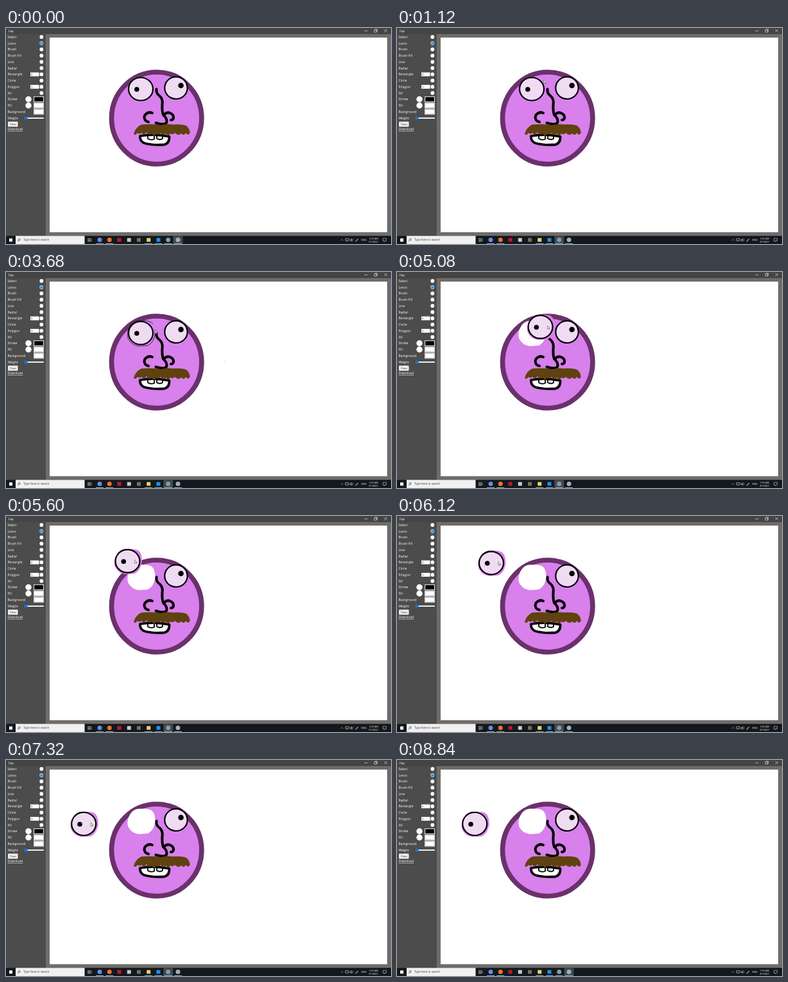
Write an HTML page that moves like this. It is 600 px wide and 338 px high and loops after 9.6 s.

```html
<!DOCTYPE html>
<html>
<head>
<meta charset="utf-8">
<style>
html, body { margin: 0; width: 100%; height: 100%; overflow: hidden; background: #6f6d6b; }
svg { display: block; width: 600px; height: 338px; }
text { font-family: "Open Sans", "Noto Sans", sans-serif; font-size: 5px; fill: #fff; }
.ink { fill: none; stroke: #000; stroke-linecap: round; stroke-linejoin: round; }
</style>
</head>
<body>
<svg viewBox="0 0 600 338">
  <defs>
    <clipPath id="cut"><path class="loop"/></clipPath>
  </defs>
  <rect width="600" height="338" fill="#6f6d6b"/>
  <rect y="9" width="62" height="317" fill="#4c4c4c"/>
  <rect width="600" height="9.5" fill="#444"/>
  <rect x="68" y="15" width="526" height="304.5" fill="#fff"/>
  <text x="4" y="6.8">File</text>
  <path d="M558.5 4.5h5M574 3h3.5v3.5h-3.500zM575 3v-1h3.500v3.500h-1M589.500 2l4.500 4.500m0-4.500l-4.500 4.500" fill="none" stroke="#ddd" stroke-width=".7"/>
  <g id="panel"></g>

  <g id="face">
    <ellipse cx="234.700" cy="141" rx="70.200" ry="72" fill="#d880ec" stroke="#6a316b" stroke-width="7.700"/>
    <g fill="#efdcf3" stroke="#000" stroke-width="2.200">
      <ellipse cx="210" cy="95.500" rx="19" ry="18"/>
      <ellipse cx="265" cy="93.700" rx="17.700" ry="17.300"/>
    </g>
    <circle cx="203.800" cy="96" r="3.800"/>
    <circle cx="272.600" cy="90" r="4.300"/>
    <g class="ink" stroke-width="4">
      <path d="M234.500 95.500Q233.500 102 239 106Q245 111 243.500 120Q243 130 245 136Q251 141 250.500 147Q249 153 233.500 148.500"/>
      <path d="M228 133C221 130 214 136 216 142Q217 146 222 147"/>
      <path d="M247 135C253 129 262 135 261 141Q260 144 257 144"/>
    </g>
    <path class="ink" d="M209 169Q208 176 215 180Q228 184 247 182.500Q255 180 254.500 170Q231 165 209 169Z" stroke-width="3.800" style="fill:#fff"/>
    <path class="ink" d="M221 168v5q4 3 10 1v-5M235 168v5q5 3 9 0v-4" stroke-width="1.800"/>
    <path d="M199 166Q201 156 211 151Q233 149.500 241 152Q250 149.500 260 151Q274 150 281 153Q287 158 286.500 165Q283 169 280 164Q278 170 273 165Q268 170 263 164Q260 168 256 165Q253 172 249 165Q246 171 241 164Q238 169 234 165Q231 172 227 165Q223 170 219 163Q215 169 211 164Q207 167 205 164Q202 169 199 166Z" fill="#5f420f"/>
  </g>

  <g id="moved">
    <path class="loop" fill="#fff"/>
    <use id="piece" href="#face" clip-path="url(#cut)"/>
  </g>
  <path id="lasso" class="loop ink" pathLength="1" stroke-width=".7"/>
  <path id="speck" d="M340 140h2.500" stroke="#ccc" stroke-width=".8"/>

  <rect y="325.300" width="600" height="12.700" fill="#12181d"/>
  <rect x="15" y="325.300" width="107.500" height="12.700" fill="#f1f1f1"/>
  <rect x="5" y="329.300" width="5" height="5" fill="#fff"/>
  <circle cx="20.800" cy="331" r="1.500" fill="none" stroke="#222" stroke-width=".6"/>
  <path d="M19.700 332.200l-1.700 1.800" stroke="#222" stroke-width=".7"/>
  <text x="27" y="333.400" style="font-size:4.400px;fill:#444">Type here to search</text>
  <rect id="active" y="325.300" width="15" height="12.700" fill="#414a50"/>
  <path d="M127.500 329.500h4v1.500h-4zM127.500 332.500h4v1.500h-4zM133 329.500v4.500" fill="none" stroke="#ddd" stroke-width=".6"/>
  <g id="apps"></g>
  <path d="M521.800 332.500l1.700-1.700 1.700 1.700M529 329.700h5v3.300h-5zM531.500 333v1.300M536 331v1.500h1l1.500 1.300v-4l-1.500 1.200zM540 330q1.500 1.700 0 3.500M544.500 334l3.500-4 1 1-3.500 3zM587.500 329.300h5v4h-2l-1 1.300v-1.300h-2z" fill="none" stroke="#ddd" stroke-width=".6"/>
  <g text-anchor="middle">
    <text x="557.700" y="333" style="font-size:4px">ENG</text>
    <text x="573" y="330.600" style="font-size:3.600px">5:55 AM</text>
    <text x="573" y="336" style="font-size:3.600px">8/1/2021</text>
  </g>
  <path id="cursor" d="M0 0v5.200l1.200-1 .9 1.900 .9-.4-.9-1.900h1.600z" fill="#fff" stroke="#333" stroke-width=".5"/>
</svg>
<script>
const $ = id => document.getElementById(id);
const LOOP = 9600, CUT = 4400, GRAB = [221, 93.5];
const loopPath = 'M229 81C225 76 217 76 205 76.500C197 78 193 84 190 92C189 99 189 103 192 107C196 113 201 115 207 116L221 115C227 112 230 107 232 99C233 92 232 85 229 81Z';
document.querySelectorAll('.loop').forEach(p => p.setAttribute('d', loopPath));

const rect = (x, y, w, h, fill, more = '') => `<rect x="${x}" y="${y}" width="${w}" height="${h}" fill="${fill}" ${more}/>`;
const dot = (x, y, r, fill) => `<circle cx="${x}" cy="${y}" r="${r}" fill="${fill}"/>`;
const label = (x, y, s, style = '') => `<text x="${x}" y="${y}" style="${style}">${s}</text>`;

function buildPanel() {
  const rows = ['Select', 'Lasso', 'Brush', 'Brush Fill', 'Line', 'Radial', 'Rectangle', 'Circle',
    'Polygon', 'Fill', 'Stroke', 'Fill', 'Background', 'Weight'];
  const values = { Rectangle: 0, Polygon: 3 };
  let out = '';
  rows.forEach((name, i) => {
    const y = 14 + i * 9.75;
    out += label(2.5, y + 1.8, name);
    if (i < 10) out += dot(55.3, y, 2.9, '#fff');
    if (name === 'Lasso') out += dot(55.3, y, 2.6, '#0b76e0') + dot(55.3, y, 1.9, '#fff') + dot(55.3, y, 1.5, '#0b76e0');
    if (name in values) out += rect(38, y - 3, 13.5, 6, '#fff') + label(39, y + 1.5, values[name], 'font-size:4px;fill:#222');
    if (i === 10 || i === 11) out += dot(35, y, 4.7, '#fff');
    if (i > 9 && i < 13) out += rect(43, y - 4.5, 16, 9, '#e8e8e8') +
      rect(44, y - 3.5, 14, 7, i === 10 ? '#000' : '#fff', 'stroke="#999" stroke-width=".4"');
  });
  out += rect(29, 140, 30, 2, '#eee', 'rx="1"') + dot(31, 141, 2.6, '#0b76e0');
  out += rect(3, 146.5, 15.5, 8, '#efefef', 'rx="1"') + label(5.8, 152.2, 'Clear', 'font-size:4.3px;fill:#222');
  out += label(2.5, 160.3, 'Download', 'text-decoration:underline');
  $('panel').innerHTML = out;
}

function buildApps() {
  const square = (x, fill) => rect(x - 3, 328.7, 6, 5.8, fill);
  const round = (x, fill) => dot(x, 331.6, 3.5, fill);
  const apps = [[round, '#7289da', 1], [round, '#f0702a', 1], [square, '#c81432'], [square, '#c8cccf'],
    [square, '#76705f'], [square, '#f3cf62', 1], [square, '#2590dc', 1], [round, '#8b9aa3', 1], [round, '#a9adb0', 1]];
  $('apps').innerHTML = apps.map(([shape, fill, open], i) => {
    const x = 146 + i * 15.25;
    return shape(x, fill) + (open ? rect(x - 6, 337, 12, 1, '#76b9ed') : '');
  }).join('');
}

// Linear interpolation through [time, ...values] keys.
function track(keys, t) {
  const i = keys.findIndex(k => k[0] > t);
  if (i < 0) return keys[keys.length - 1].slice(1);
  if (i === 0) return keys[0].slice(1);
  const a = keys[i - 1], b = keys[i], u = (t - a[0]) / (b[0] - a[0]);
  return a.slice(1).map((v, j) => v + (b[j + 1] - v) * u);
}

const approach = [[40, 268, 331], [300, 325, 190], [440, 341, 138], [720, 172, 86], [1000, 222, 80], [1120, 229, 81]];
const tracing = [[1360, 0], [2360, .46], [3680, .92], [4150, 1]];
const drag = [[4150, 229, 81], [4350, ...GRAB], [4600, ...GRAB], [4840, 231, 88], [5080, 234.5, 84], [5320, 233, 73.5],
  [5700, 189, 67], [6120, 158, 71.5], [6320, 149, 77], [6800, 134, 96], [7320, 132.2, 98],
  [7400, 132.2, 98], [7760, 195, 205], [8120, 268, 331]];

const lasso = $('lasso'), lassoLength = lasso.getTotalLength();
const show = (id, on) => $(id).setAttribute('visibility', on ? 'visible' : 'hidden');
const place = (id, x, y) => $(id).setAttribute('transform', `translate(${x} ${y})`);

function draw(t) {
  const [traced] = track(tracing, t);
  let pos;
  if (t < 1360) pos = track(approach, t);
  else if (t < 4150) {
    const p = lasso.getPointAtLength(traced * lassoLength);
    pos = [p.x, p.y];
  } else pos = track(drag, t);
  place('cursor', ...pos);
  show('cursor', t >= 40 && t < 8320);

  lasso.setAttribute('stroke-dasharray', `${traced} 2`);
  show('lasso', t > 1360 && t < CUT);
  show('moved', t >= CUT);
  const held = track(drag, Math.min(Math.max(t, 4600), 7320));
  place('piece', held[0] - GRAB[0], held[1] - GRAB[1]);

  show('speck', t >= 440 && t < 4800);
  $('active').setAttribute('x', t < 120 || t >= 8320 ? 260.5 : 245.3);
}

function frame(now) {
  draw(now % LOOP);
  requestAnimationFrame(frame);
}
buildPanel();
buildApps();
requestAnimationFrame(frame);
</script>
</body>
</html>
```
